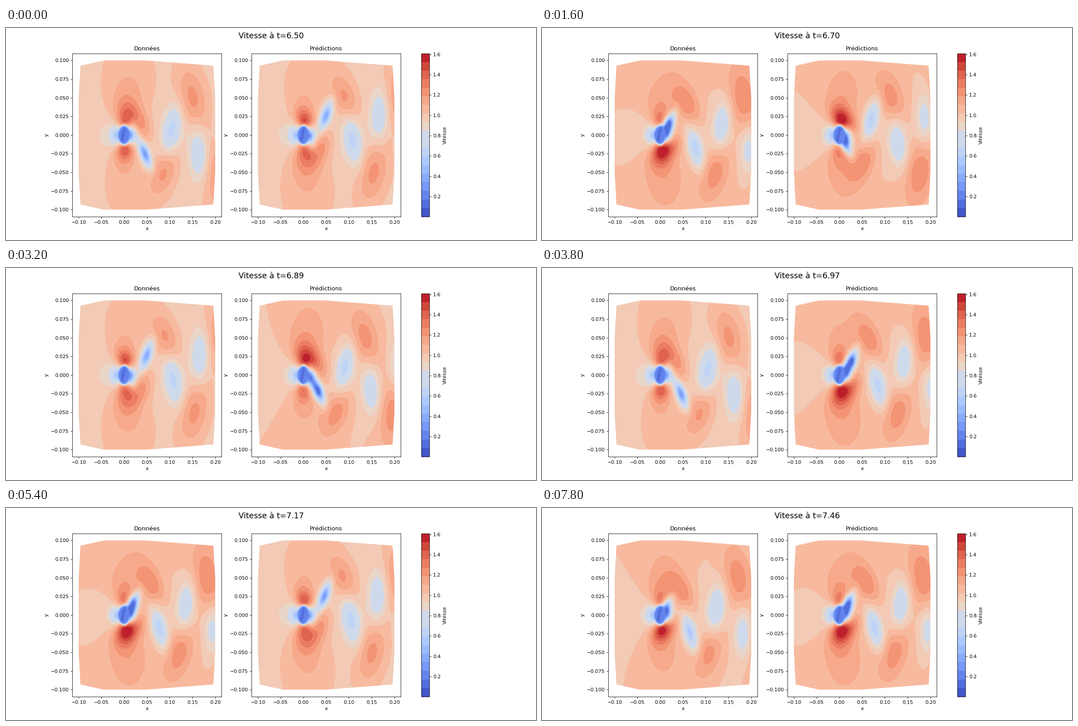
Animation, 1183 px wide and 473 px high, one loop 8000 ms. Source, as a matplotlib script:

```python
import numpy as np
import matplotlib.pyplot as plt
from matplotlib.animation import FuncAnimation
from matplotlib.cm import ScalarMappable
from matplotlib.colors import ListedColormap, Normalize
from matplotlib.patches import Polygon

WIDTH, HEIGHT = 1183, 473
DPI = WIDTH / 15
FRAMES, INTERVAL = 40, 200
T_START, T_STEP = 6.50, 0.02465

# Shedding cycle of each panel: phase at the start and period in frames
PANELS = [("Données", 0.0, 6.33), ("Prédictions", 0.53, 6.8)]

BANDS = 19
LEVELS = np.linspace(0.002, 1.609, BANDS + 1)
NORM = Normalize(LEVELS[0], LEVELS[-1])
colors = plt.get_cmap("coolwarm")((np.arange(BANDS) + 0.5) / BANDS)
colors[9] = colors[8]  # the neutral band shares the pale blue
CMAP = ListedColormap(colors)

X, Y = np.meshgrid(np.linspace(-0.1, 0.2, 241), np.linspace(-0.1, 0.1, 201))
R2 = X**2 + Y**2
TOP = [(-0.1, 0.05), (-0.096, 0.093), (-0.045, 0.1),
       (0.048, 0.1), (0.196, 0.093), (0.2, 0.05)]
HULL = TOP + [(x, -y) for x, y in reversed(TOP)]


def ease(u):
    u = np.clip(u, 0, 1)
    return u * u * (3 - 2 * u)


def wave(cycles):
    return np.cos(2 * np.pi * cycles)


def bump(y, cx, cy, angle, length, width, amp):
    """Rotated Gaussian."""
    c, s = np.cos(np.radians(angle)), np.sin(np.radians(angle))
    dx, dy = X - cx, y - cy
    along, across = (c * dx + s * dy) / length, (c * dy - s * dx) / width
    return amp * np.exp(-(along**2 + across**2) / 2)


def streak(y, tip_x, tip_y, width, amp):
    """Soft band from the body's centre to a tip."""
    along = (X * tip_x + y * tip_y) / (tip_x**2 + tip_y**2)
    along = np.clip(along, 0, 1)
    d2 = (X - along * tip_x)**2 + (y - along * tip_y)**2
    return amp * np.exp(-d2 / width**2)


def slow_vortex(y, age):
    """Slow core: grows behind the body, breaks off at age 0, drifts away."""
    cx = max(0.046 + 0.118 * age, 0.012)
    cy = 0.016 + 0.010 * wave(age - 0.05)
    spread = 1 - np.exp(-3 * max(age, 0))
    amp = (0.28 + 0.29 * np.exp(-4 * max(age, 0))) * ease((age + 0.6) / 0.35)
    core = bump(y, cx, cy, min(55 + 31 * age, 90),
                0.016 + 0.009 * spread, 0.0065 + 0.008 * spread, amp)
    attached = 0.55 * np.exp(-((age + 0.2) / 0.17)**2)
    return core + streak(y, cx, cy, 0.011, attached)


def fast_vortex(y, age):
    """Fast core: hugs the body's flank, then lifts off and follows."""
    cx = 0.012 + 0.015 * np.log1p(np.exp((0.125 * age - 0.049) / 0.015))
    cy = 0.016 + 0.032 * ease((age - 0.45) / 0.45)
    amp = 0.24 + 0.16 * np.exp(-((age - 0.28) / 0.2)**2)
    return bump(y, cx, cy, -15 - 32 * age, 0.020 + 0.008 * age,
                0.010 + 0.007 * max(age, 0), amp * ease((age + 0.4) / 0.55))


def speed(phase):
    phase %= 1
    # Flow around the body, with its slow rise and tilt during the cycle
    v = 0.988 + (0.00034 * Y**2 - 0.00022 * X**2) / (R2 + 0.0003)**2
    v += 0.021 * (1 + wave(2 * (phase - 0.27)))
    v += 0.04 * Y * wave(phase - 0.25)
    v -= bump(Y, -0.016, 0, 0, 0.010, 0.009, 0.30)
    v -= bump(Y, 0.012, 0, 0, 0.010, 0.007, 0.50)
    v -= bump(Y, 0.110, 0, 0, 0.040, 0.030, 0.05)
    for y, start in ((-Y, phase), (Y, (phase + 0.5) % 1)):
        v += bump(y, 0.018, 0.05, 0, 0.035, 0.04, 0.045 * (1 - wave(start + 0.1)))
        for age in start + np.arange(-1, 3):
            v += fast_vortex(y, age) - slow_vortex(y, age)
    body = 0.14 + 9 * np.abs(0.9 * X - 0.3 * Y + 0.002)
    inside = 1 / (1 + np.exp(np.clip((np.sqrt(R2) - 0.0133) / 0.0009, -50, 50)))
    return np.clip(v + (body - v) * inside, 0.12, 1.6)


fig, axes = plt.subplots(1, 2, dpi=DPI, facecolor="white",
                         figsize=((WIDTH + 0.001) / DPI, (HEIGHT + 0.001) / DPI))
title = fig.suptitle("", fontsize=16)
for ax, (name, _, _) in zip(axes, PANELS):
    ax.set(title=name, xlabel="x", ylabel="y",
           xlim=(-0.1141, 0.2141), ylim=(-0.1094, 0.1094))
fig.colorbar(ScalarMappable(NORM, CMAP), ax=axes, label="Vitesse",
             ticks=np.arange(1, 9) * 0.2, format="%.1f")
hulls = [Polygon(HULL, transform=ax.transData) for ax in axes]
fields = []


def draw(frame):
    while fields:
        fields.pop().remove()
    title.set_text(f"Vitesse à t={T_START + frame * T_STEP:.2f}")
    for ax, hull, (_, start, period) in zip(axes, hulls, PANELS):
        field = ax.contourf(X, Y, speed(start + frame / period), LEVELS,
                            cmap=CMAP, norm=NORM)
        field.set_clip_path(hull)
        fields.append(field)
    return [title, *fields]


anim = FuncAnimation(fig, draw, frames=FRAMES, interval=INTERVAL,
                     init_func=lambda: draw(0), repeat=True, repeat_delay=0)
plt.show()
```
